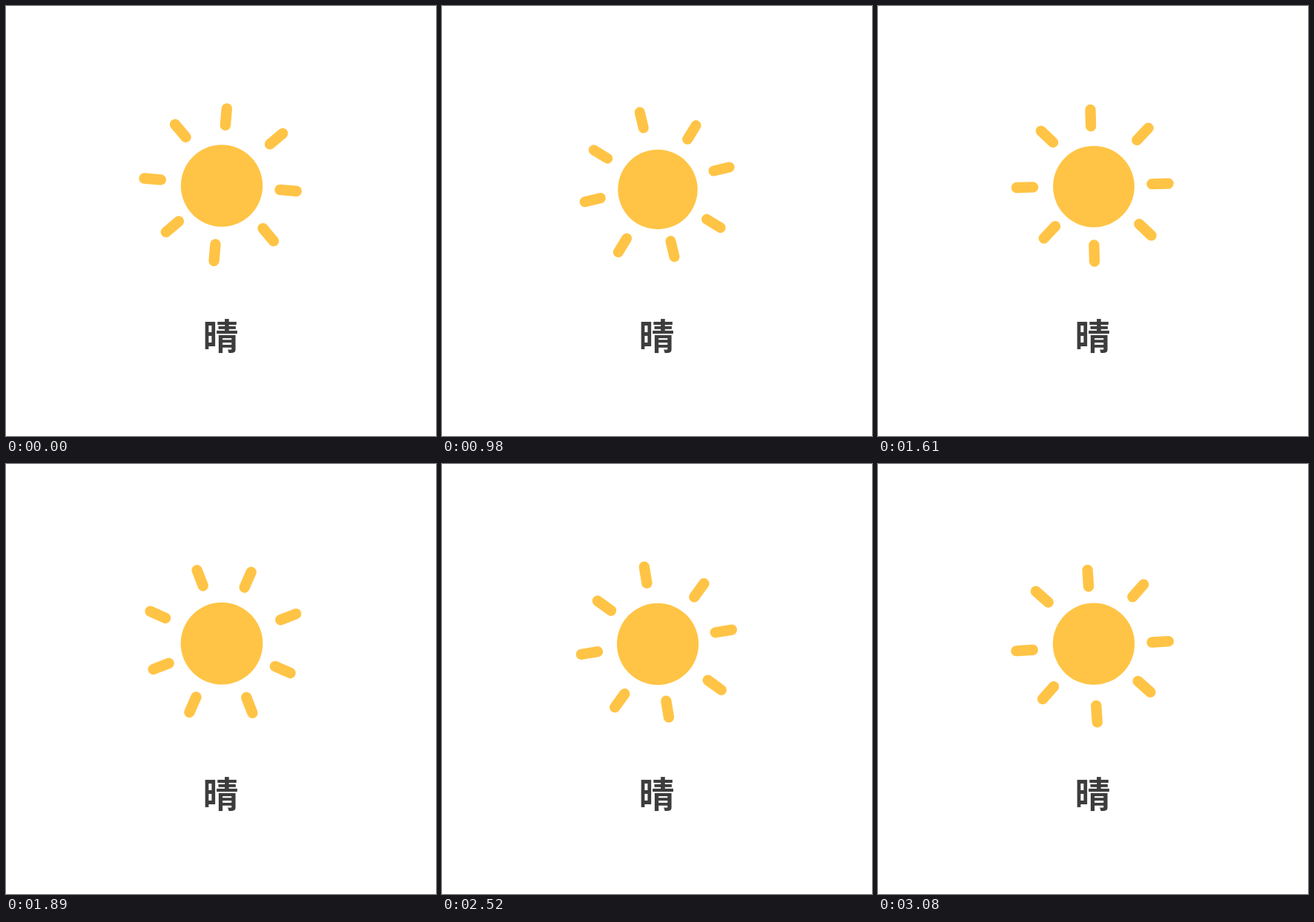
An HTML page with a canvas for the animation above (3150 ms loop, 580 by 580 pixels).

```html
<!DOCTYPE html>
<html lang="zh">
<head>
<meta charset="utf-8">
<style>
  html, body { margin: 0; width: 100%; height: 100%; overflow: hidden; background: #fff; }
  canvas, svg { position: absolute; left: 0; top: 0; width: 580px; height: 580px; }
  text { font: 700 48px "Noto Sans CJK SC", "Noto Sans CJK", "Noto Sans CJK JP", sans-serif; fill: #3d3d3d; }
</style>
</head>
<body>
<canvas id="stage" width="580" height="580"></canvas>
<svg viewBox="0 0 580 580"><text x="289.5" y="462.5" text-anchor="middle">晴</text></svg>
<script>
const ctx = document.getElementById('stage').getContext('2d');
const COLOR = '#ffc445';
const STEP = 70, STEPS = 45;
const SUN = { x: 291, y: 242.5, r: 55.2, rise: 187 };
const RAY = { dist: 91.8, half: 11.2, width: 14.4 };
const ENTER = 5, LANDED = 9;

// Rays turn around a point slightly off the disc's centre.
const PIVOT = { x: -0.95, y: -1.9 };
const GROUPS = [
  { x: 0.59, y: 0.84, turn: 0 },
  { x: -2.57, y: -4.25, turn: Math.PI / 4 }
];

// Damped wobble around the resting size.
function wobble(n) {
  return 0.044 * Math.exp(-0.115 * (n - 10)) * Math.cos(2 * Math.PI * (n - 10.6) / 7.5);
}

function growth(n) {
  const left = Math.max(0, (LANDED - n) / (LANDED - ENTER));
  return 1 + wobble(n) - Math.pow(left, 2.4);
}

function drawRays(group) {
  ctx.save();
  ctx.translate(group.x, group.y);
  ctx.rotate(group.turn);
  ctx.beginPath();
  for (let i = 0; i < 4; i++) {
    ctx.moveTo(0, -RAY.dist - RAY.half);
    ctx.lineTo(0, -RAY.dist + RAY.half);
    ctx.rotate(Math.PI / 2);
  }
  ctx.stroke();
  ctx.restore();
}

function drawSun(scale, degrees) {
  ctx.save();
  ctx.translate(SUN.x, SUN.y + SUN.rise * (1 - scale));
  ctx.scale(scale, scale);
  ctx.fillStyle = ctx.strokeStyle = COLOR;
  ctx.beginPath();
  ctx.arc(0, 0, SUN.r, 0, 2 * Math.PI);
  ctx.fill();
  ctx.lineWidth = RAY.width;
  ctx.lineCap = 'round';
  ctx.translate(PIVOT.x, PIVOT.y);
  ctx.rotate(degrees * Math.PI / 180);
  GROUPS.forEach(drawRays);
  ctx.restore();
}

function draw(time) {
  const n = Math.floor(time / STEP) % STEPS;
  ctx.clearRect(0, 0, 580, 580);
  if (n === 0) drawSun(1, 94.8);
  else if (n > ENTER) drawSun(growth(n), 6.2 + 6.328 * (n - 10));
}

const start = performance.now();
function tick() {
  draw(performance.now() - start);
  requestAnimationFrame(tick);
}
tick();
</script>
</body>
</html>
```
